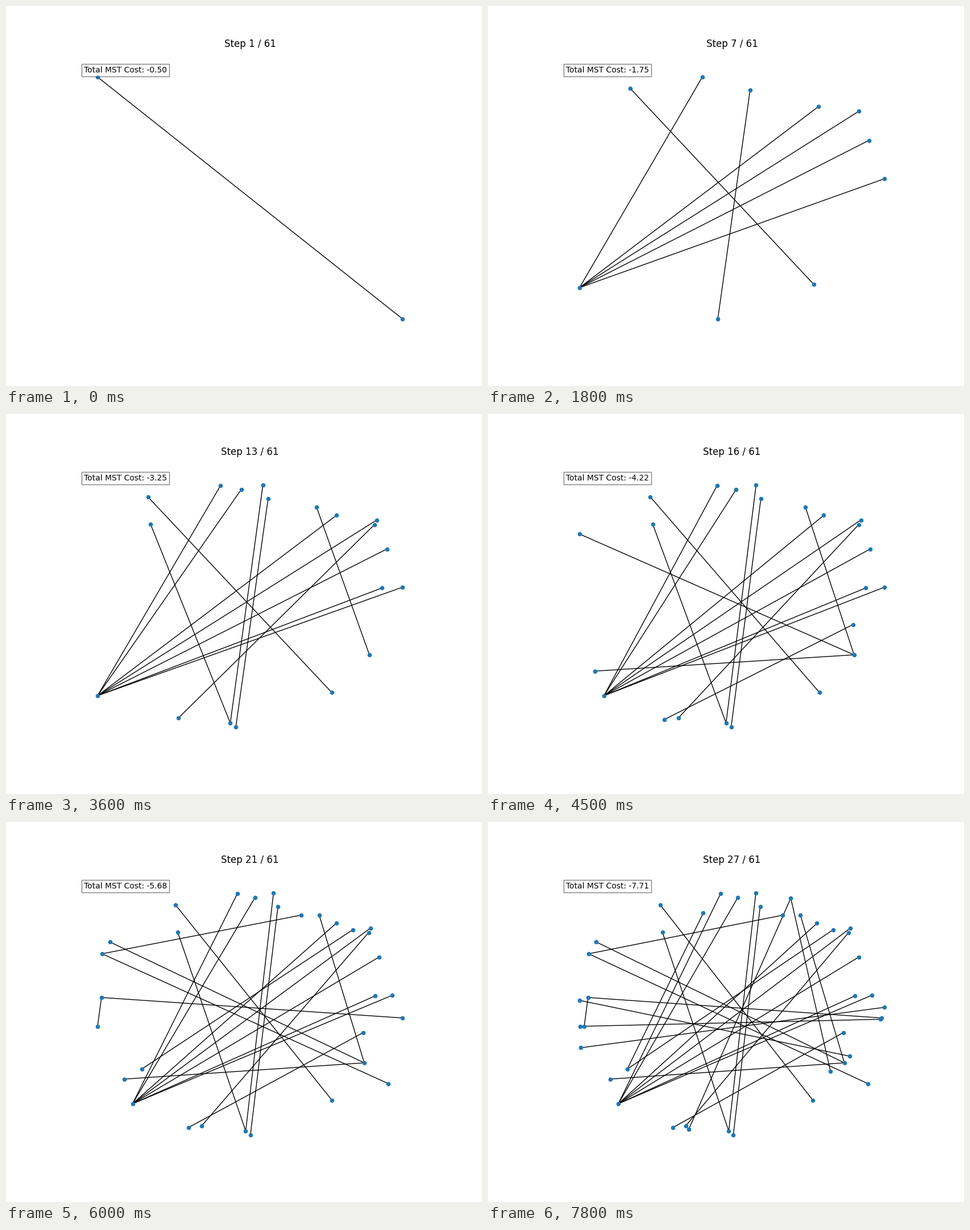
Write a matplotlib script that moves like this. It is 837x669 px and loops after 8000 ms.

```python
import matplotlib.pyplot as plt
import numpy as np
from matplotlib.animation import FuncAnimation
from matplotlib.collections import LineCollection

WIDTH, HEIGHT, DPI = 837, 669, 100
TICK_MS, TICKS, TICKS_PER_STEP = 100, 80, 3
TOTAL_STEPS = 61
PADDING = 1.21  # axes span relative to the span of the visible nodes

# Nodes shared by several edges
HUB = (229.3, 496)
SOUTH = (423.3, 544)
EAST = (626.6, 424)
WEST = (177, 232)
FAR_WEST = (176, 309)
INNER = (245, 435)
CROWN = (532.4, 134)

# Edges in the order they join the tree; y points down
EDGES = [
    ((303, 146), (571.4, 490)),
    (HUB, (637.3, 186.7)),
    (HUB, (674.8, 305)),
    ((478.6, 149), (431.4, 550.7)),
    (HUB, (578.5, 178.3)),
    (HUB, (652.1, 237.7)),
    (HUB, (408.8, 126.5)),
    ((471, 125), SOUTH),
    (HUB, (645, 306.3)),
    (HUB, (439.4, 132.8)),
    ((306.9, 194.3), SOUTH),
    ((549.5, 164.5), EAST),
    ((634, 194.7), (347.7, 535)),
    ((190.5, 211.3), EAST),
    ((624.9, 370.7), (325, 538)),
    ((215.3, 452.6), EAST),
    ((518.5, 164), WEST),
    (WEST, (668, 460.6)),
    (FAR_WEST, (692, 345)),
    (FAR_WEST, (169.2, 360)),
    ((607, 189.6), INNER),
    ((378.5, 160.3), INNER),
    (CROWN, (353.3, 540.5)),
    ((161, 314), (636, 412.3)),
    (CROWN, (602.4, 439.3)),
    ((162, 359.8), (689.7, 347.3)),
    ((163, 397.5), (697, 326.3)),
]

COST_STEPS = [1, 5, 10, 16, 19, 21, 27]
COSTS = [-0.50, -1.41, -2.27, -4.22, -5.48, -5.68, -7.71]

# The small surplus keeps the pixel size from being rounded down
fig = plt.figure(
    figsize=((WIDTH + 0.01) / DPI, (HEIGHT + 0.01) / DPI), dpi=DPI, facecolor="white"
)
ax = fig.add_subplot()
ax.axis("off")
title = ax.set_title("", fontsize=12)
lines = LineCollection([], colors="black", linewidths=1.0, zorder=1)
ax.add_collection(lines, autolim=False)
dots = ax.scatter([], [], s=20, color="#1f78b4", zorder=2)
label = ax.text(
    0.05, 0.95, "", transform=ax.transAxes, fontsize=10, va="top", zorder=3,
    bbox=dict(boxstyle="square,pad=0.3", facecolor="white", alpha=0.5),
)


def padded_limits(values):
    low, high = values.min(), values.max()
    center, half = (low + high) / 2, (high - low) / 2 * PADDING
    return center - half, center + half


def update(tick):
    step = tick // TICKS_PER_STEP + 1
    edges = EDGES[:step]
    nodes = np.array(sorted({node for edge in edges for node in edge}))
    lines.set_segments(edges)
    dots.set_offsets(nodes)
    ax.set_xlim(*padded_limits(nodes[:, 0]))
    ax.set_ylim(*padded_limits(nodes[:, 1])[::-1])
    title.set_text(f"Step {step} / {TOTAL_STEPS}")
    label.set_text(f"Total MST Cost: {np.interp(step, COST_STEPS, COSTS):.2f}")
    return lines, dots, title, label


animation = FuncAnimation(
    fig, update, frames=TICKS, interval=TICK_MS, repeat=True, repeat_delay=0
)
plt.show()
```
